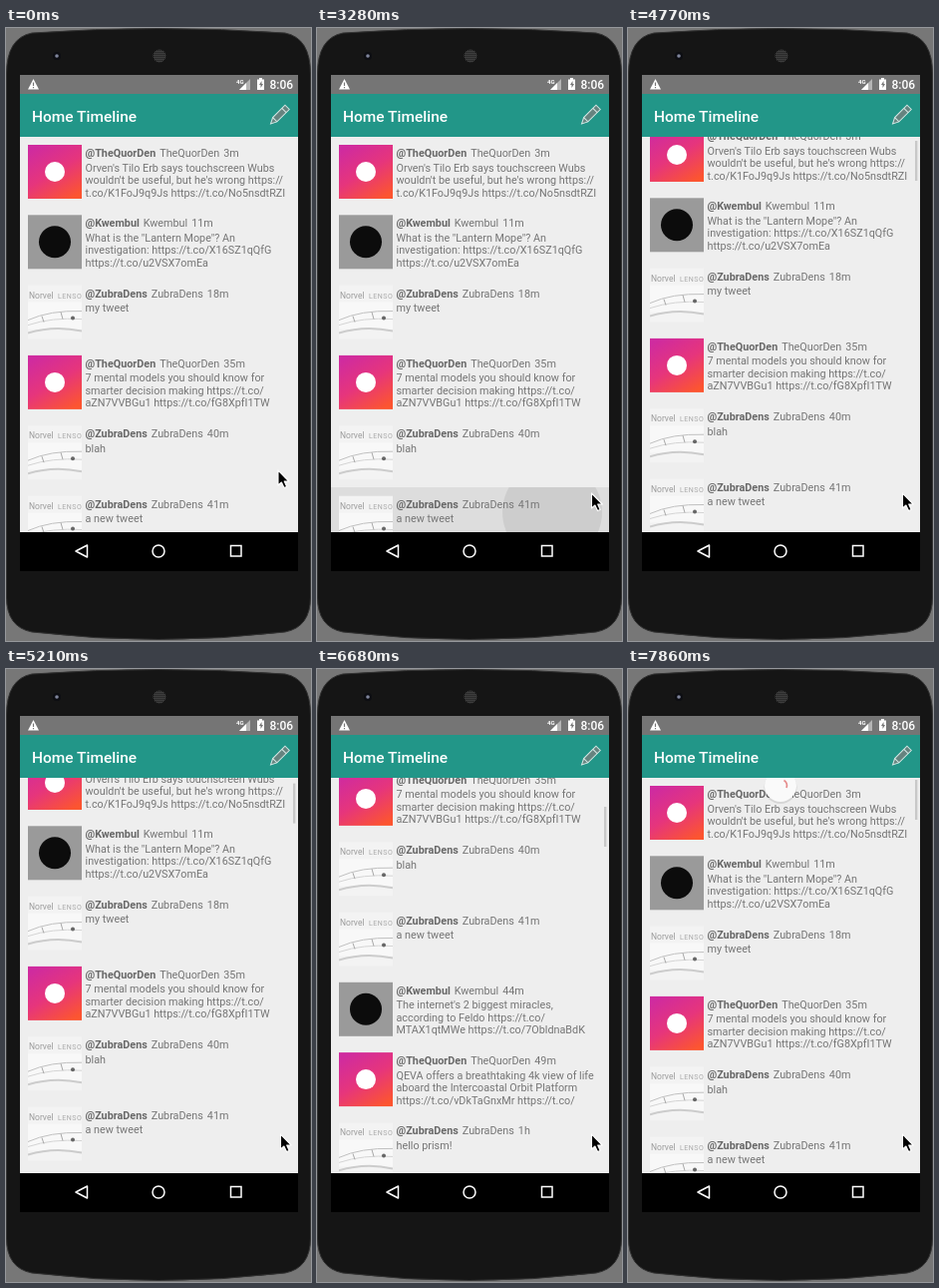
An HTML page that plays this animation: 306 px wide and 614 px high, repeating every 8 s.

```html
<!DOCTYPE html>
<html lang="en">
<head>
<meta charset="utf-8">
<title>Home Timeline</title>
<style>
html, body { margin: 0; width: 100%; height: 100%; overflow: hidden; background: #777; }
svg { display: block; width: 306px; height: 614px; font: 10.8px Roboto, sans-serif; }
.name { font-weight: 700; fill: #686868; }
.copy { fill: #757575; }
.title { font-size: 15.5px; font-weight: 500; fill: #fff; }
.clock { font-size: 12px; font-weight: 500; fill: #fff; }
</style>
</head>
<body>
<svg viewBox="0 0 306 614" xmlns="http://www.w3.org/2000/svg">
  <defs>
    <linearGradient id="pink" x1=".2" y1="0" x2=".8" y2="1">
      <stop offset="0" stop-color="#cf2b9f"/>
      <stop offset=".5" stop-color="#e6357c"/>
      <stop offset="1" stop-color="#fc5530"/>
    </linearGradient>
    <clipPath id="view"><rect x="14" y="109" width="279" height="396"/></clipPath>
    <clipPath id="pressed"><rect x="14" y="460" width="279" height="45"/></clipPath>
    <clipPath id="tile"><rect width="54" height="54"/></clipPath>
    <pattern id="mesh" width="2" height="2" patternUnits="userSpaceOnUse">
      <rect width="2" height="2" fill="#3c3c3c"/><rect width="1" height="1" fill="#1c1c1c"/>
    </pattern>

    <g id="warm">
      <rect width="54" height="54" fill="url(#pink)"/>
      <circle cx="27" cy="27" r="10" fill="#fff"/>
    </g>
    <g id="grey">
      <rect width="54" height="54" fill="#9a9a9a"/>
      <circle cx="27" cy="27" r="16" fill="#0c0c0c"/>
    </g>
    <g id="photo" clip-path="url(#tile)">
      <rect width="54" height="54" fill="#f3f3f3"/>
      <rect y="17" width="54" height="27" fill="#f8f8f8"/>
      <text x="1" y="13" font-size="8.5" fill="#9c9c9c">Norvel</text>
      <text x="30" y="13" font-size="7" fill="#a8a8a8" letter-spacing=".5">LENSO</text>
      <g fill="none" stroke="#c0c0c0">
        <path d="M0 35Q22 25 54 26"/>
        <path d="M0 40Q24 32 54 34" stroke="#d4d4d4"/>
        <path d="M14 31l2 6M33 27l2 7" stroke="#a8a8a8"/>
        <path d="M0 48Q26 40 54 46" stroke="#cccccc" stroke-width="2"/>
      </g>
      <circle cx="45" cy="33" r="2" fill="#666"/>
    </g>
  </defs>

  <rect width="306" height="614" fill="#777"/>
  <rect x="0" y="115" width="3" height="98" rx="1" fill="#2a2a2a"/>
  <path d="M.5 46Q.5 10 26 5Q153 -4 280 5Q305.500 10 305.500 46V570Q305.500 600 280 605Q153 620 26 605Q.5 600 .5 570Z" fill="#151515" stroke="#333"/>
  <circle cx="51" cy="28" r="4" fill="#0c0d12"/>
  <circle cx="51" cy="28" r="1.8" fill="#80869c"/>
  <circle cx="154" cy="28" r="6.5" fill="url(#mesh)"/>
  <rect x="14" y="47" width="279" height="497" fill="#000"/>
  <rect x="14" y="109" width="279" height="396" fill="#eee"/>

  <g clip-path="url(#view)">
    <g id="press" clip-path="url(#pressed)">
      <rect id="shade" x="14" y="460" width="279" height="45"/>
      <circle id="ripple" opacity=".07"/>
    </g>
    <g id="list"></g>
    <rect id="thumb" x="288" width="2.4" height="40" fill="#c8c8c8"/>
    <g id="spinner">
      <circle cy="1.5" r="16.5" fill="#000" opacity=".1"/>
      <circle r="16" fill="#fafafa"/>
      <path d="M3.5 -5.5A6.5 6.5 0 0 1 6 2" fill="none" stroke="#e58a8a" stroke-width="1.6"/>
    </g>
  </g>

  <rect x="14" y="47" width="279" height="19" fill="#757575"/>
  <rect x="14" y="66" width="279" height="43" fill="#229688"/>
  <path d="M27.500 51L33 61.500H22Z" fill="#fff"/>
  <path d="M27.500 54.500v3.500M27.500 59v1.300" stroke="#757575" stroke-width="1.2"/>
  <path d="M245 51V62H234Z" fill="#b4b4b4"/>
  <path d="M241 55V62H234Z" fill="#fff"/>
  <text x="231" y="56" font-size="6" font-weight="700" fill="#fff">4G</text>
  <path d="M254 50h3v1.500h2V62h-7V51.500h2Z" fill="#fff"/>
  <path d="M256.500 53l-2.500 4h1.500v3l2.500-4h-1.500Z" fill="#757575"/>
  <text class="clock" x="264.500" y="61">8:06</text>
  <text class="title" x="26" y="94">Home Timeline</text>
  <g transform="translate(274 87.500) rotate(45)" fill="#66837f" stroke="#d4e8e5">
    <path d="M-3 -11.500h6V6L0 12L-3 6Z"/>
    <path d="M-3 -7h6M-3 6h6" fill="none"/>
  </g>

  <g fill="none" stroke="#fff" stroke-width="1.5">
    <path d="M81.500 518V530L70 524Z" stroke-linejoin="round"/>
    <circle cx="153" cy="524" r="6"/>
    <rect x="225.500" y="518.500" width="10.500" height="10.500"/>
  </g>
  <path id="cursor" d="M0 0V15L3.400 12L6 17.600L8.700 16.400L6.200 11H10.800Z" fill="#000" stroke="#fff" stroke-width="1.1" stroke-linejoin="round"/>
</svg>

<script>
const LOOP = 8000, PITCH = 70.3, TOP = 109;
const $ = id => document.getElementById(id);
const SVG = "http://www.w3.org/2000/svg";

const users = { warm: "TheQuorDen", grey: "Kwembul", photo: "ZubraDens" };
const posts = [
  ["warm", "3m", "Orven's Tilo Erb says touchscreen Wubs", "wouldn't be useful, but he's wrong https://", "t.co/K1FoJ9q9Js https://t.co/No5nsdtRZI"],
  ["grey", "11m", "What is the \"Lantern Mope\"? An", "investigation: https://t.co/X16SZ1qQfG", "https://t.co/u2VSX7omEa"],
  ["photo", "18m", "my tweet"],
  ["warm", "35m", "7 mental models you should know for", "smarter decision making https://t.co/", "aZN7VVBGu1 https://t.co/fG8XpfI1TW"],
  ["photo", "40m", "blah"],
  ["photo", "41m", "a new tweet"],
  ["grey", "44m", "The internet's 2 biggest miracles,", "according to Feldo https://t.co/", "MTAX1qtMWe https://t.co/7ObldnaBdK"],
  ["warm", "49m", "QEVA offers a breathtaking 4k view of life", "aboard the Intercoastal Orbit Platform", "https://t.co/vDkTaGnxMr https://t.co/"],
  ["photo", "1h", "hello prism!"]
];

function add(parent, tag, attrs, text) {
  const el = document.createElementNS(SVG, tag);
  for (const key in attrs) el.setAttribute(key, attrs[key]);
  if (text) el.textContent = text;
  return parent.appendChild(el);
}

posts.forEach(([kind, age, ...lines], i) => {
  const row = add($("list"), "g", { transform: `translate(0 ${TOP + i * PITCH})` });
  add(row, "use", { href: "#" + kind, x: 22, y: 8 });
  const head = add(row, "text", { x: 79.5, y: 20, class: "copy" });
  add(head, "tspan", { class: "name" }, "@" + users[kind]);
  add(head, "tspan", { dx: 4 }, users[kind]);
  add(head, "tspan", { dx: 4 }, age);
  lines.forEach((line, n) => add(row, "text", { x: 79.5, y: 34.5 + n * 12.5, class: "copy" }, line));
});

// Each step: time, then the values held until the next step.
const pointer = [[0, 273, 443], [300, 270, 472], [450, 266, 508], [600, 262, 543], [750, 260, 561],
  [1490, 268, 488], [1640, 273, 473], [1790, 275.5, 466]];
const scroll = [[0, 0], [3580, 3], [3730, 6], [3870, 9], [4170, 11], [4620, 14], [4770, 17],
  [5070, 30], [5220, 44], [5370, 60], [5510, 78], [5660, 97], [5800, 115], [5950, 131], [6100, 146],
  [6390, 180], [6530, 204], [6680, 225], [6830, 238], [6980, 245],
  [7420, 165], [7570, 80], [7720, 18], [7860, 0]];
const shade = [[0, 0], [2380, .04], [2680, .07], [3430, .04], [3580, 0]];
const spinner = [[0, 80], [7720, 99], [7860, 117]];

function at(steps, t) {
  let now = steps[0];
  for (const step of steps) if (step[0] <= t) now = step;
  return now;
}

function place(el, x, y) {
  el.setAttribute("transform", `translate(${x} ${y})`);
}

function draw(t) {
  const [, px, py] = at(pointer, t);
  place($("cursor"), px, py);

  const y = at(scroll, t)[1];
  place($("list"), 0, -y);
  $("thumb").setAttribute("y", 111 + y * .12);
  $("thumb").setAttribute("opacity", t >= 3580 ? 1 : 0);

  $("shade").setAttribute("opacity", at(shade, t)[1]);
  // The ripple grows while its centre drifts towards the middle of the row.
  const grow = Math.floor((t - 2680) / 150);
  const live = t >= 2680 && t < 3580;
  $("ripple").setAttribute("cx", 276 - grow * 10);
  $("ripple").setAttribute("cy", 475 + grow * 2.5);
  $("ripple").setAttribute("r", live ? 10 + grow * 10 : 0);

  place($("spinner"), 153, at(spinner, t)[1]);
}

const start = performance.now();
function tick() {
  draw((performance.now() - start) % LOOP);
  requestAnimationFrame(tick);
}
tick();
</script>
</body>
</html>
```
